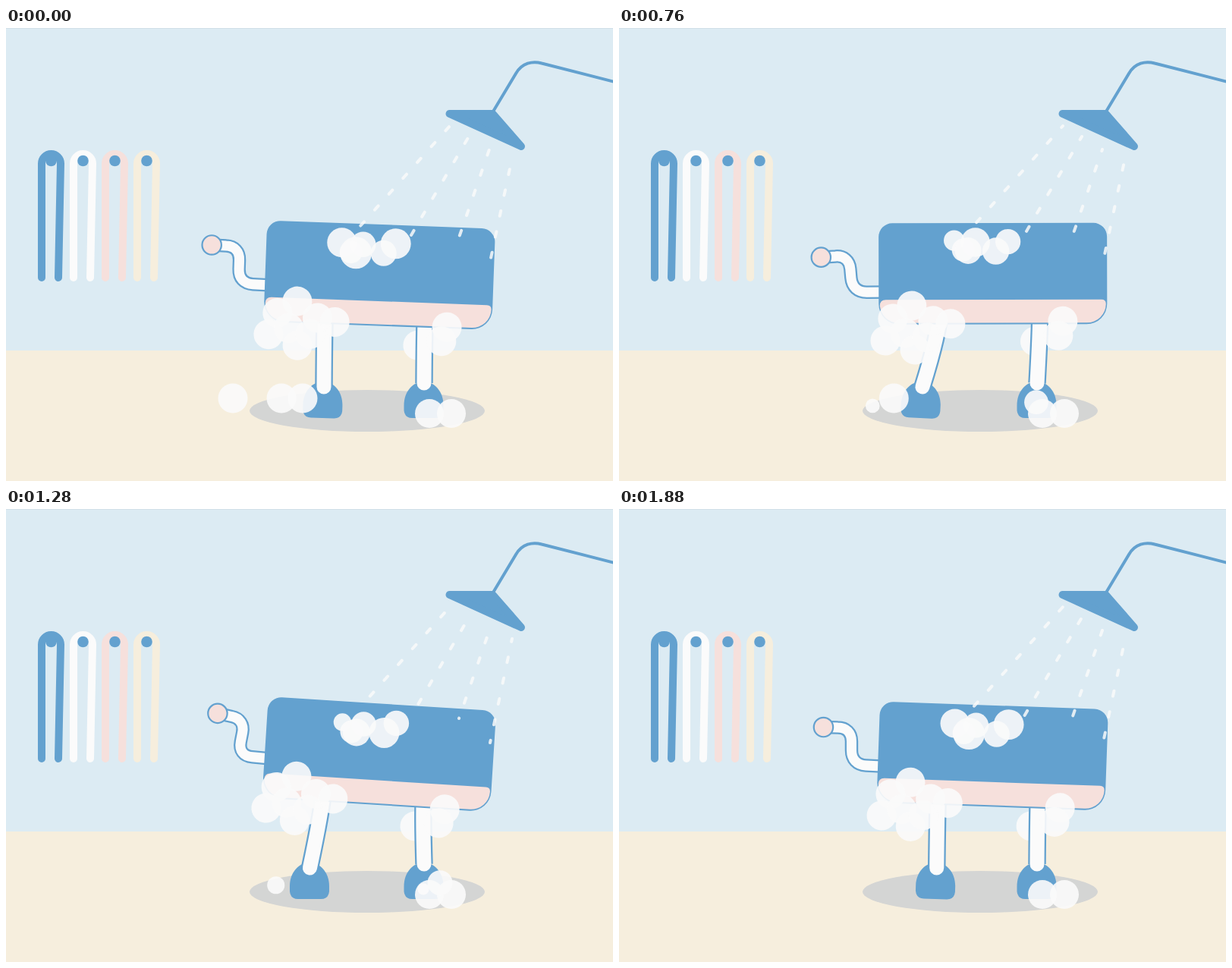
Write an HTML page that moves like this. It is 800 px wide and 597 px high and loops after 1920 ms.

```html
<!DOCTYPE html>
<html lang="en">
<head>
<meta charset="utf-8">
<title>Bath time</title>
<style>
  html, body { margin: 0; width: 100%; height: 100%; overflow: hidden; background: #dcebf3; }
  svg { display: block; width: 100vw; height: 100vh; }
  .blue { fill: #63a1cf; }
  .line { fill: none; stroke: #63a1cf; stroke-linejoin: round; }
  .white { fill: none; stroke: #fbfbfb; stroke-linejoin: round; }
  .pink { fill: #f6e0dc; }
  .towel { fill: none; stroke-width: 10; stroke-linecap: round; }
  .foam circle { fill: #fbfbfb; fill-opacity: .91; }
  #water path { fill: none; stroke: #fbfbfb; stroke-opacity: .84; stroke-width: 4; stroke-linecap: round; stroke-dasharray: 7 21; }
</style>
</head>
<body>
<svg viewBox="0 0 800 597" preserveAspectRatio="none">
  <defs>
    <path id="foot" class="blue" d="M-26 31C-26 13-14 0 0 0S26 13 26 31V38Q25 48 15 48H-15Q-25 48-26 38Z"/>
    <path id="loop" d="M47 329V178.500a12.500 12.500 0 0 1 25 0L69 329"/>
  </defs>

  <rect width="800" height="597" fill="#dcebf3"/>
  <rect width="800" height="1" fill="#d3e0e8"/>
  <rect y="425" width="800" height="172" fill="#f6eedd"/>

  <g id="towels"></g>

  <path class="line" stroke-width="4" d="M804 71.500L706 46.500C694 43 680 46 672 60L642 110"/>
  <path class="line" stroke-width="10" style="fill:#63a1cf" d="M584.500 113H641.500L679 156Z"/>

  <ellipse cx="476" cy="504.500" rx="155" ry="27.500" fill="#d4d5d4"/>

  <g id="foamBack" class="foam"></g>
  <use id="backFoot" href="#foot"/>
  <use href="#foot" x="550.500" y="466"/>
  <path id="backLine" class="line" stroke-width="23.500"/>
  <path id="backLeg" class="white" stroke-width="19" stroke-linecap="round"/>
  <path id="frontLine" class="line" stroke-width="23.500"/>
  <path id="frontLeg" class="white" stroke-width="19" stroke-linecap="round"/>

  <path id="tailLine" class="line" stroke-width="17.500"/>
  <path id="tail" class="white" stroke-width="13"/>
  <circle id="tip" class="line" r="12.700" stroke-width="2.200" style="fill:#f6e0dc"/>

  <g id="body">
    <path class="blue" d="M-132.500-66.500H132.500a18 18 0 0 1 18 18V40a27 27 0 0 1-27 27H-123.500a27 27 0 0 1-27-27V-48.500a18 18 0 0 1 18-18Z"/>
    <path class="pink" d="M-141 34.500H143q6 0 6 6a25 25 0 0 1-25 24.500H-124a25 25 0 0 1-25-22.500q0-8 8-8Z"/>
  </g>
  <g id="foamFront" class="foam"></g>
  <g id="suds" class="foam"></g>
  <g id="bubbles" class="foam">
    <circle cx="558" cy="508" r="19"/>
    <circle cx="587" cy="508" r="19"/>
  </g>
  <g id="water"></g>
</svg>

<script>
const LOOP = 1920, STEP = 40, BUBBLE = 19.5;
const $ = id => document.getElementById(id);

function set(el, attrs) {
  for (const k in attrs) el.setAttribute(k, attrs[k]);
}
function add(id, tag, attrs) {
  const el = document.createElementNS('http://www.w3.org/2000/svg', tag);
  set(el, attrs);
  $(id).append(el);
  return el;
}
const circle = (id, cx, cy, r = BUBBLE) => add(id, 'circle', { cx, cy, r });

function rotate(x, y, deg) {
  const a = deg * Math.PI / 180, c = Math.cos(a), s = Math.sin(a);
  return [x * c - y * s, x * s + y * c];
}
const clamp = u => Math.max(0, Math.min(1, u));
const wave = u => Math.cos(2 * Math.PI * u);

// Eases from one [time, value] turning point to the next, around the loop.
function swing(...keys) {
  return t => {
    const n = keys.findIndex(k => k[0] > t);
    const [t1, b] = keys[Math.max(n, 0)];
    const [t0, a] = keys.at(n - 1 < 0 ? -1 : n - 1);
    const u = ((t - t0 + LOOP) % LOOP) / ((t1 - t0 + LOOP) % LOOP);
    return a + (b - a) * (1 - wave(u / 2)) / 2;
  };
}

const tilt = swing([0, 2.1], [270, -5], [490, -5], [1080, 6.3], [1550, -0.7]);
const height = swing([0, 325.5], [350, 318.5], [1080, 327], [1500, 318.5]);
const wag = swing([30, 2.5], [580, -14], [1080, 17], [1720, -9.5]);
const ankle = swing([0, 419], [260, 399.5], [1400, 400.5]);
const footTilt = swing([0, 2], [340, 10.5], [1000, 0], [1500, 0]);

['#63a1cf', '#fbfbfb', '#f6e0dc', '#f6eedd'].forEach((stroke, i) => {
  add('towels', 'use', { href: '#loop', x: 42 * i, stroke, class: 'towel' });
  add('towels', 'circle', { cx: 59.5 + 42 * i, cy: 175, r: 7.3, class: 'blue' });
});

// Foam under the belly, in body coordinates.
circle('foamBack', 55.5, 89.5);
[
  [-107, 42], [-132, 59], [-142, 88], [-116, 78], [-103, 100],
  [-79, 62], [-56, 66], [-87, 84], [92, 63], [86, 82]
].forEach(([x, y]) => circle('foamFront', x, y));

// Suds on the back swell and shrink: x, y, mean radius, swell, time of peak.
const suds = [
  [-71, -1.5, 15.5, 4.5, 150], [-43, 1, 17.5, 2, 600], [-59, 11, 15, 0, 0],
  [-52.5, 12, 19, 2, 0], [-16, 12.5, 18, 2, 1280], [0, 0, 18, 2, 50]
].map(([x, y, mean, swell, peak]) => ({ el: circle('suds', x, y), mean, swell, peak }));

// Bubbles drifting off the back foot, each shrinking over its own span.
const drifting = [[299, 0, 640], [363, 500, 1000], [391, 1060, 1600]]
  .map(([x, from, to]) => ({ el: circle('bubbles', x, 488), x, from, to }));

// Bubbles rising and sinking by the front foot.
const rising = [[550, 16, 120, 1500], [572, 17, 840, 1880]]
  .map(([x, size, from, to]) => ({ el: circle('bubbles', x, 508), size, from, to }));

// Water lines, with the first drop's distance from the start.
const water = [
  ['M585 129L466 262', 5], ['M610 143L534 273', 7],
  ['M637 160L597 276', 4.5], ['M667 171L638 308', 19]
].map(([d, first]) => ({ el: add('water', 'path', { d }), first }));

function drawFoam(t) {
  for (const { el, mean, swell, peak } of suds) {
    set(el, { r: mean + swell * wave((t - peak) / LOOP) });
  }
  for (const { el, x, from, to } of drifting) {
    const gone = clamp((t - from) / (to - from));
    set(el, { cx: x - 40 * (1 - Math.exp(-t / 600)), cy: 488 + 19 * gone, r: BUBBLE * (1 - gone) });
  }
  for (const { el, size, from, to } of rising) {
    const r = size * Math.sin(Math.PI * clamp((t - from) / (to - from)));
    set(el, { cy: 508 - 0.93 * r, r });
  }
}

function drawTail(t, angle, cy) {
  const x = 307.5 - angle / 2, y = cy + 24 - 6.1 * angle, bend = wag(t);
  const at = (dx, dy, deg) => rotate(dx, dy, deg).map((v, i) => v + (i ? y : x));
  const root = dx => at(dx, 0, angle * 1.5);
  const out = (dx, dy) => at(dx, dy, bend);
  const d = `M${root(48)}L${root(19)}C${root(7)} ${out(0, -7)} ${out(0, -19)}L${out(0, -31)}`
    + `C${out(0, -42)} ${out(-7, -49)} ${out(-18, -49)}L${out(-37, -49.5)}`;
  set($('tailLine'), { d });
  set($('tail'), { d });
  const [cx, cy2] = out(-37, -49.5);
  set($('tip'), { cx, cy: cy2 });
}

function draw(t) {
  const angle = tilt(t), cx = 492.7 - 0.25 * angle, cy = height(t);
  const onBody = (x, y) => {
    const [dx, dy] = rotate(x, y, angle);
    return [cx + dx, cy + dy];
  };
  const drawLeg = (name, hip, x, y) => {
    const d = `M${onBody(hip, 50)}Q${onBody(hip, 75)} ${x} ${y}`;
    set($(name + 'Line'), { d });
    set($(name + 'Leg'), { d });
  };

  const body = `translate(${cx} ${cy}) rotate(${angle})`;
  const foam = `${body} rotate(${angle * 0.8} 10 42)`;
  set($('body'), { transform: body });
  set($('foamBack'), { transform: foam });
  set($('foamFront'), { transform: foam });
  set($('suds'), { transform: `translate(${onBody(20, -42)})` });

  const foot = ankle(t);
  set($('backFoot'), { transform: `translate(${foot - 0.5} 466) rotate(${footTilt(t)})` });
  drawLeg('back', -70, foot, 473);
  drawLeg('front', 62, 551, 468);
  drawTail(t, angle, cy);
  drawFoam(t);

  const flow = 28 * t / 960;
  water.forEach(w => set(w.el, { 'stroke-dashoffset': 3.5 - w.first - flow }));
}

const start = performance.now();
function tick() {
  const t = (performance.now() - start) % LOOP;
  draw(Math.floor(t / STEP) * STEP);
  requestAnimationFrame(tick);
}
tick();
</script>
</body>
</html>
```
